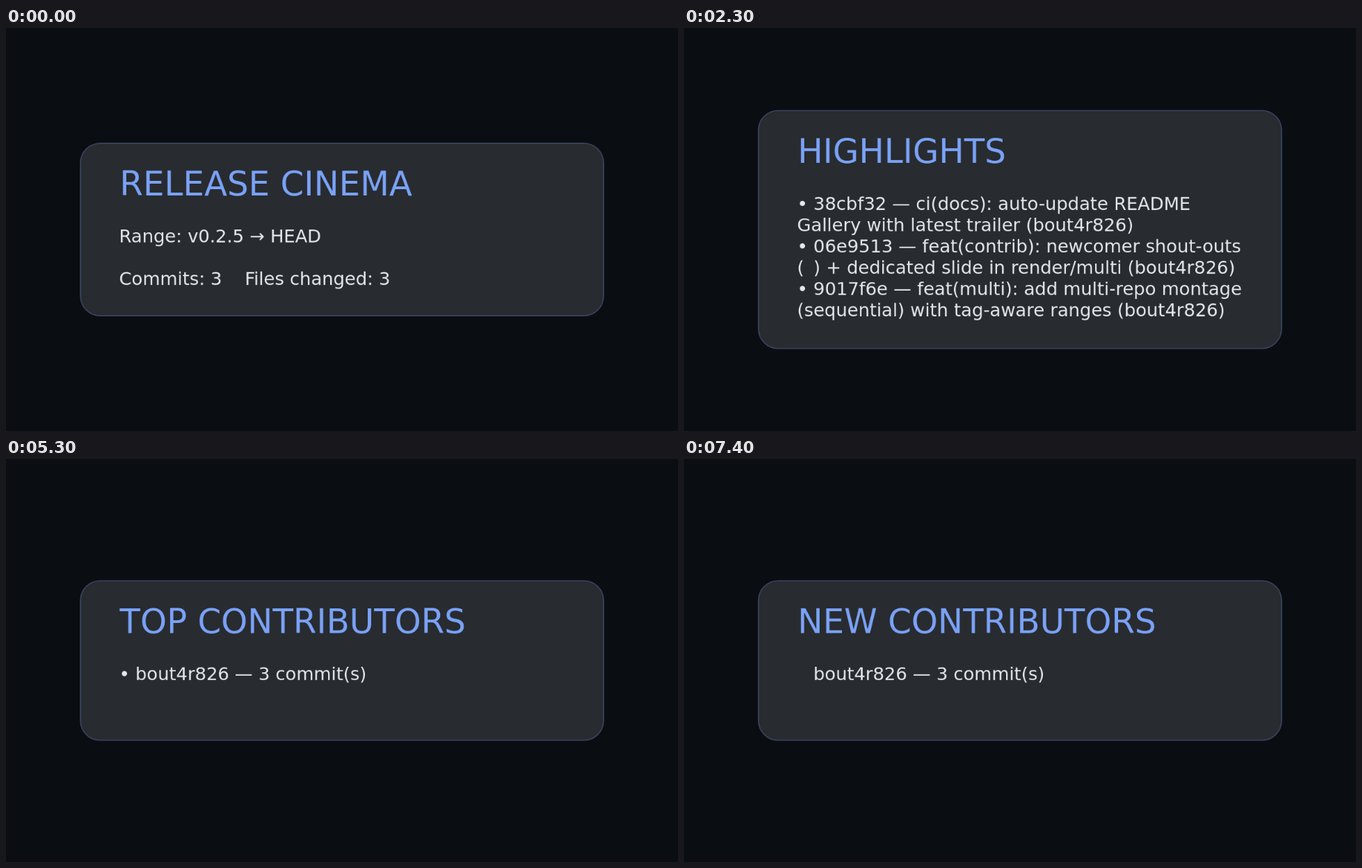
An HTML page with a canvas for the animation above (8 s loop, 966 px wide and 580 px high).

```html
<!DOCTYPE html>
<html lang="en">
<head>
<meta charset="utf-8">
<title>Release slides</title>
<style>
  html, body { margin: 0; width: 100%; height: 100%; overflow: hidden; background: #0a0d12; }
  canvas { display: block; width: 100vw; height: 100vh; }
</style>
</head>
<body>
<canvas id="stage" width="1200" height="720"></canvas>
<script>
const LOOP = 8000, LEFT = 202, LINE = 38, MID = 360;
const BACK = "#0a0d12", CARD = "#282b2f", EDGE = "#3b4460", ACCENT = "#7aa2f7", INK = "#e6e8ec";
const user = "bout4r826";
const ctx = document.getElementById("stage").getContext("2d");

// half: half the card height; indent: offset of the body text;
// a line is a string, or [text, offset, text] with a gap between its parts
const slides = [
  { start: 0, half: 154, title: "RELEASE CINEMA", lines: [
    "Range: v0.2.5 → HEAD",
    "",
    "Commits: 3    Files changed: 3"
  ] },
  { start: 500, half: 212.5, title: "HIGHLIGHTS", lines: [
    "• 38cbf32 — ci(docs): auto-update README",
    `Gallery with latest trailer (${user})`,
    "• 06e9513 — feat(contrib): newcomer shout-outs",
    ["(", 29, `) + dedicated slide in render/multi (${user})`],
    "• 9017f6e — feat(multi): add multi-repo montage",
    `(sequential) with tag-aware ranges (${user})`
  ] },
  { start: 3500, half: 142.5, title: "TOP CONTRIBUTORS", lines: [`• ${user} — 3 commit(s)`] },
  { start: 6500, half: 142.5, title: "NEW CONTRIBUTORS", indent: 29, lines: [`${user} — 3 commit(s)`] }
];

function write(text, x, y, size, color) {
  ctx.font = `${size}px "DejaVu Sans", sans-serif`;
  ctx.fillStyle = color;
  ctx.fillText(text, x, Math.floor(y));
}

function paint({ half, title, indent = 0, lines }) {
  const top = MID - half;
  ctx.fillStyle = BACK;
  ctx.fillRect(0, 0, 1200, 720);

  ctx.beginPath();
  ctx.roundRect(133, top, 934, 2 * half, 35);
  ctx.fillStyle = CARD;
  ctx.fill();
  ctx.strokeStyle = EDGE;
  ctx.lineWidth = 2;
  ctx.stroke();

  write(title, LEFT + 1, top + 93.5, 60, ACCENT);
  lines.forEach((line, i) => {
    const [head, gap, tail] = [].concat(line);
    const x = LEFT + indent, y = top + 177.5 + i * LINE;
    write(head, x, y, 32, INK);
    if (tail) write(tail, x + gap, y, 32, INK);
  });
}

let shown;
function frame() {
  const t = performance.now() % LOOP;
  const slide = slides.findLast(s => t >= s.start);
  if (slide !== shown) paint(shown = slide);
  requestAnimationFrame(frame);
}
frame();
</script>
</body>
</html>
```
